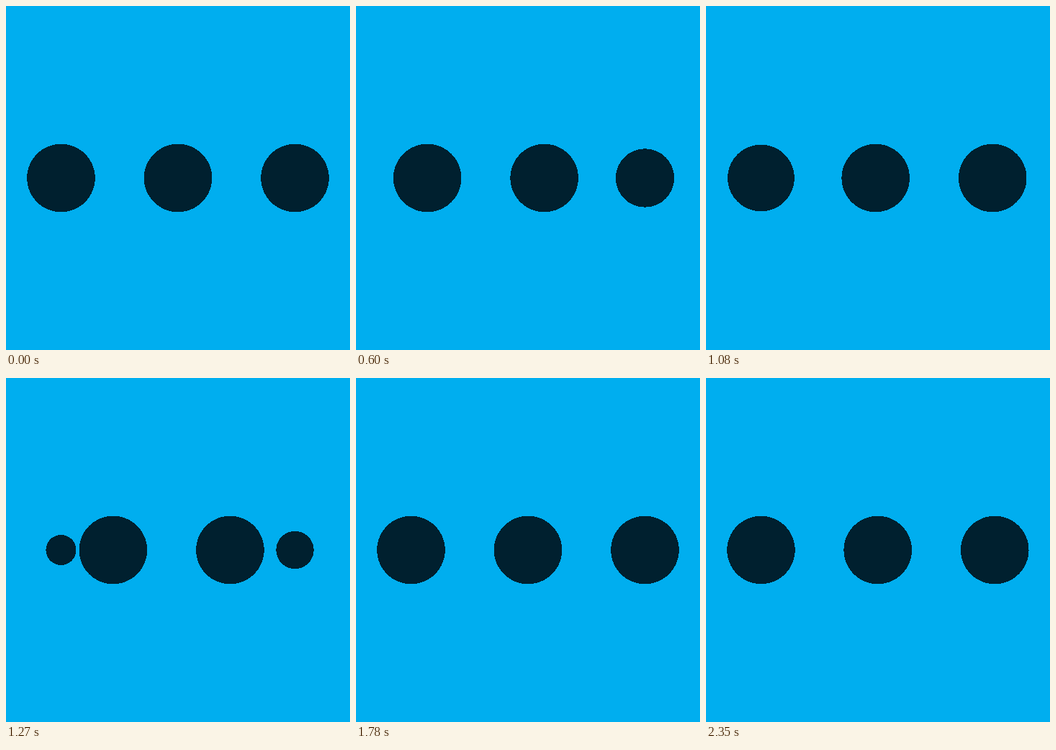
An HTML page for the animation above (2380 ms loop, 478 px wide and 478 px high).

```html
<!DOCTYPE html>
<html lang="en">
<head>
<meta charset="utf-8">
<title>Loading dots</title>
<style>
  html, body { margin: 0; width: 100%; height: 100%; overflow: hidden; background: #00aeef; }
  svg { display: block; width: 100%; height: 100%; }
</style>
</head>
<body>
<svg viewBox="0 0 478 478" fill="#00202f" shape-rendering="crispEdges">
  <rect width="478" height="478" fill="#00aeef"/>
  <circle cy="239"/><circle cy="239"/><circle cy="239"/><circle cy="239"/>
</svg>
<script>
  const LOOP = 2380, STEPS = 79, R = 47.3, LEFT = 76.48, GAP = 162.52;
  const dots = document.querySelectorAll('circle');

  // cubic-bezier(0, 0.5, 0.5, 1)
  function ease(x) {
    let lo = 0, hi = 1;
    for (let i = 0; i < 30; i++) {
      const s = (lo + hi) / 2;
      if (1.5 * s * s - 0.5 * s ** 3 < x) lo = s; else hi = s;
    }
    return 1.5 * lo - 0.5 * lo ** 3;
  }

  function place(dot, cx, r) {
    dot.setAttribute('cx', cx.toFixed(3));
    dot.setAttribute('r', r.toFixed(3));
  }

  // 30 ms steps, with one 40 ms step just before 1120 ms
  function stepAt(t) {
    return Math.floor((t < 1120 ? Math.min(t, 1109) : t - 10) / 30);
  }

  function draw(ms) {
    const x = stepAt(ms % LOOP) / STEPS * 4 % 1;
    const p = x ? ease(x) : 0;
    place(dots[0], LEFT, R * p);
    place(dots[1], LEFT + GAP * p, R);
    place(dots[2], LEFT + GAP * (1 + p), R);
    place(dots[3], LEFT + GAP * 2, R * (1 - p));
  }

  let start;
  function tick(now) {
    if (start === undefined) start = now;
    draw(Math.max(0, now - start));
    requestAnimationFrame(tick);
  }
  draw(0);
  requestAnimationFrame(tick);
</script>
</body>
</html>
```
